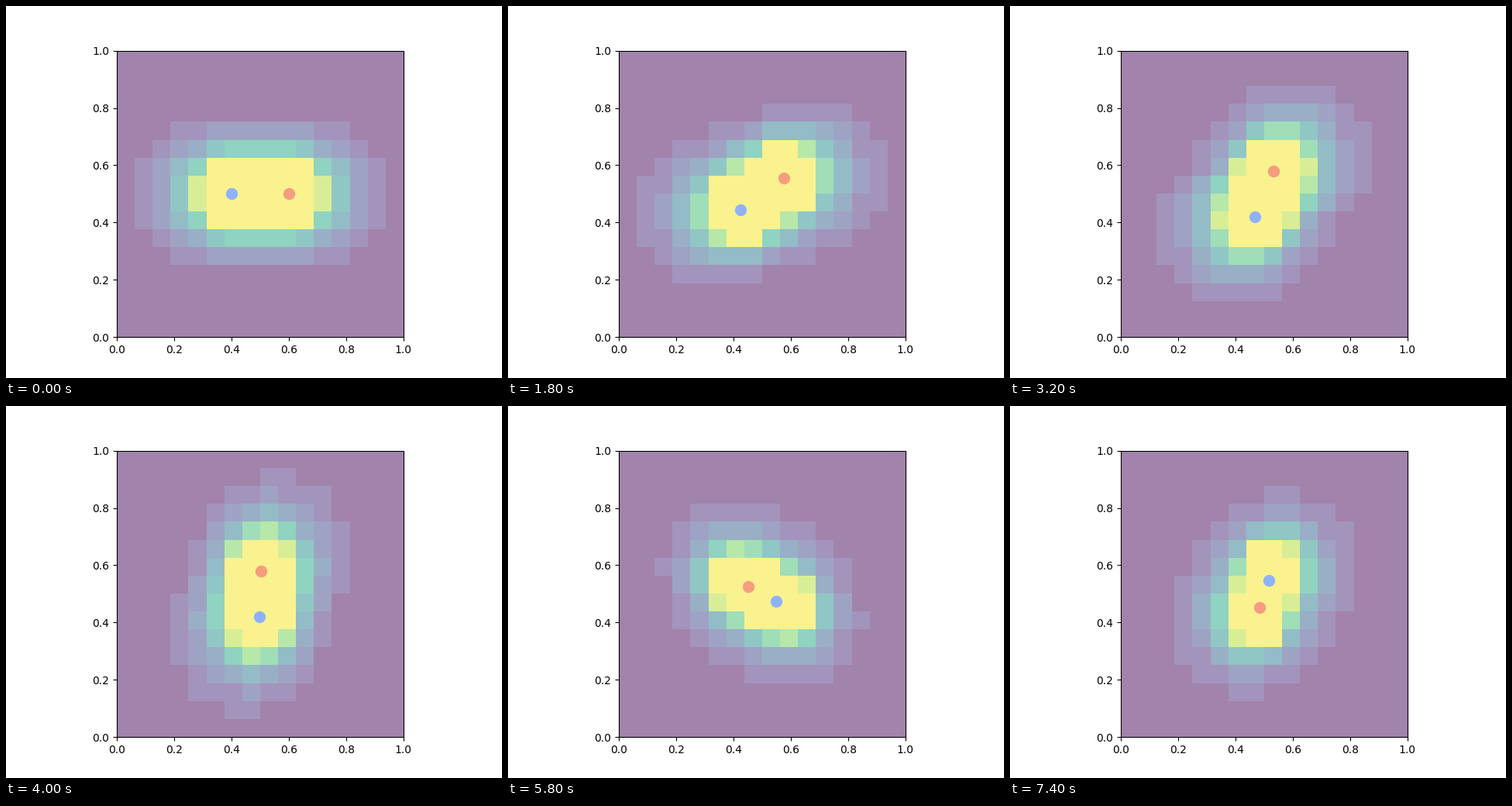
A matplotlib script for the animation above (7500 ms loop, 640 by 480 pixels).

```python
import numpy as np
import matplotlib.pyplot as plt
from matplotlib.animation import FuncAnimation

FRAMES, INTERVAL, N, TOP = 75, 100, 16, 10

# Key points of the orbit: seconds, distance from centre, degrees turned
TIMES = np.array([0, 1.2, 2.5, 4.0, 5.8, 6.8, 7.4])
RADIUS = np.array([.1, .0975, .0915, .0799, .0551, .045, .05])
TURN = np.array([0, 23.7, 51.6, 87.6, 152.2, 212.7, 251.1])

axis = np.arange(N) + .5 - N / 2
gx, gy = np.meshgrid(axis, -axis)
DIST, ANGLE = np.hypot(gx, gy), np.arctan2(gy, gx)


def smooth(values, t):
    """Cubic Hermite curve through the key points."""
    k = min(np.searchsorted(TIMES, t, side="right"), len(TIMES) - 1) - 1
    span = TIMES[k + 1] - TIMES[k]
    u = (t - TIMES[k]) / span
    slope = np.gradient(values, TIMES, edge_order=2) * span
    return ((1 + 2 * u) * (1 - u) ** 2 * values[k] + u * (1 - u) ** 2 * slope[k]
            + u * u * (3 - 2 * u) * values[k + 1] - u * u * (1 - u) * slope[k + 1])


def orbit(t):
    return smooth(RADIUS, t), np.radians(smooth(TURN, t))


def oval(mean, stretch, tilt):
    return mean + stretch * np.cos(2 * (ANGLE - tilt))


def density(t):
    """Cloud with a core that turns with the bodies and a rim that trails behind."""
    r, turn = orbit(t)
    lag = np.radians(16) * (1 - np.exp(-2 * t))
    core = oval(1.8 + 9 * r, .7, turn)
    rim = oval(4.6 + 12 * r, 15 * r, turn - lag)
    level = TOP ** (1 - (DIST - core) / (rim - core))
    return np.floor(np.clip(level, 0, TOP))


def bodies(t):
    r, turn = orbit(t)
    step = r * np.array([np.cos(turn), np.sin(turn)])
    return .5 - step, .5 + step


fig, ax = plt.subplots(figsize=(6.4, 4.8), dpi=100)
image = ax.imshow(density(0), extent=(0, 1, 0, 1), cmap="viridis", alpha=.5,
                  vmin=-.2, vmax=TOP + .2, interpolation="nearest")
dots = [ax.scatter(*p, s=100, color=plt.cm.coolwarm(c), zorder=3)
        for p, c in zip(bodies(0), (.26, .74))]
ax.set(xlim=(0, 1), ylim=(0, 1))


def update(i):
    t = i * INTERVAL / 1000
    image.set_data(density(t))
    for dot, p in zip(dots, bodies(t)):
        dot.set_offsets(p)
    return image, *dots


anim = FuncAnimation(fig, update, frames=FRAMES, interval=INTERVAL,
                     repeat=True, repeat_delay=0)
plt.show()
```
